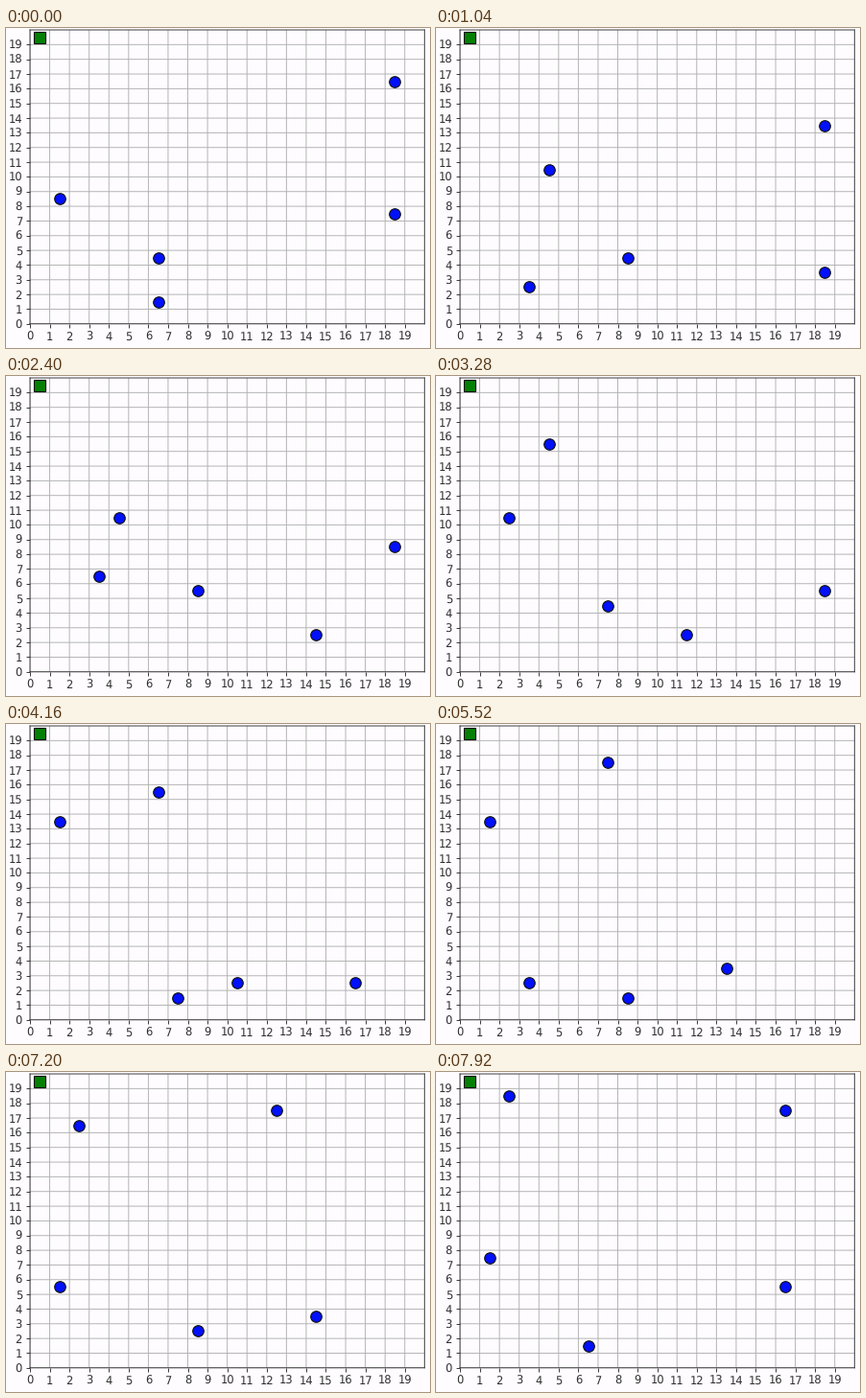
Recreate the animation shown at these times as a matplotlib script. Size 442x334 px, loop 8 s.

```python
import random

import matplotlib.pyplot as plt
from matplotlib.animation import FuncAnimation

W, H = 442, 334
FRAMES, INTERVAL = 100, 80
CELLS = 20
SCALE = 0.83
LINE = 0.8 * SCALE
INK, PAPER = "#303030", "#fefcff"

# Frames in which all agents rest
IDLE = {10, 16, 17, 22, 43, 46, 53, 57, 67, 70, 71, 77, 87, 88, 95}

# Frame -> cell (column, row) of each agent; they roam freely in between
KEYS = {
    0: [(1, 8), (6, 4), (6, 1), (18, 16), (18, 7)],
    13: [(4, 10), (8, 4), (3, 2), (18, 13), (18, 3)],
    30: [(4, 10), (8, 5), (3, 6), (18, 8), (14, 2)],
    52: [(6, 15), (7, 1), (1, 13), (16, 2), (10, 2)],
    69: [(7, 17), (3, 2), (1, 13), (13, 3), (8, 1)],
    81: [(10, 17), (1, 3), (1, 16), (12, 2), (9, 3)],
    99: [(16, 17), (1, 7), (2, 18), (16, 5), (6, 1)],
}


def steps_between(start, end, rng):
    """Single-cell steps from start to end, with a detour on short trips."""
    steps = []
    for axis in range(2):
        gap = end[axis] - start[axis]
        step = [0, 0]
        step[axis] = 1 if gap > 0 else -1
        steps += [tuple(step)] * abs(gap)
    if len(steps) < 4:
        steps += rng.choice([[(1, 0), (-1, 0)], [(-1, 0), (1, 0)],
                             [(0, 1), (0, -1)], [(0, -1), (0, 1)]])
    rng.shuffle(steps)
    return steps


def roam(rng):
    """Cells of all agents in every frame."""
    times = list(KEYS)
    cells = [KEYS[0]]
    for t0, t1 in zip(times, times[1:]):
        slots = [f for f in range(t0 + 1, t1 + 1) if f not in IDLE]
        busy = dict.fromkeys(slots, 0)
        moves = []
        for start, end in zip(KEYS[t0], KEYS[t1]):
            steps = steps_between(start, end, rng)
            rng.shuffle(slots)
            chosen = sorted(slots, key=busy.get)[:len(steps)]
            for f in chosen:
                busy[f] += 1
            moves.append(dict(zip(sorted(chosen), steps)))
        for f in range(t0 + 1, t1 + 1):
            shifts = [m.get(f, (0, 0)) for m in moves]
            cells.append([(x + dx, y + dy)
                          for (x, y), (dx, dy) in zip(cells[-1], shifts)])
    return cells


cells = roam(random.Random(4))

plt.rcParams.update({
    "font.family": "DejaVu Sans",
    "font.size": 10 * SCALE,
    "text.hinting": "none",
    "axes.linewidth": LINE,
    "axes.edgecolor": INK,
    "xtick.color": INK,
    "ytick.color": INK,
})
fig = plt.figure(figsize=(W / 100, H / 100), dpi=100, facecolor=PAPER)
ax = fig.add_axes([25 / W, (H - 308.8) / H, 411.3 / W, 306.8 / H],
                  facecolor=PAPER)
ax.set_xlim(0, CELLS)
ax.set_ylim(0, CELLS)
ax.set_xticks(range(CELLS))
ax.set_yticks(range(CELLS))
ax.tick_params(length=3.5 * SCALE, pad=3.5 * SCALE, width=LINE)
ax.grid(color="#b0b0b0", lw=LINE, snap=False)
for spine in ax.spines.values():
    spine.set_snap(False)

style = dict(ls="none", ms=10 * SCALE, mec="#101010", mew=SCALE,
             zorder=3, snap=False)
ax.plot([0.5], [CELLS - 0.5], marker="s", mfc="#048004", **style)
dots, = ax.plot([], [], marker="o", mfc="#0010fc", **style)


def draw(frame):
    dots.set_data([x + 0.5 for x, _ in cells[frame]],
                  [y + 0.5 for _, y in cells[frame]])
    return dots,


anim = FuncAnimation(fig, draw, frames=FRAMES, interval=INTERVAL,
                     init_func=lambda: draw(0), repeat=True)
plt.show()
```
